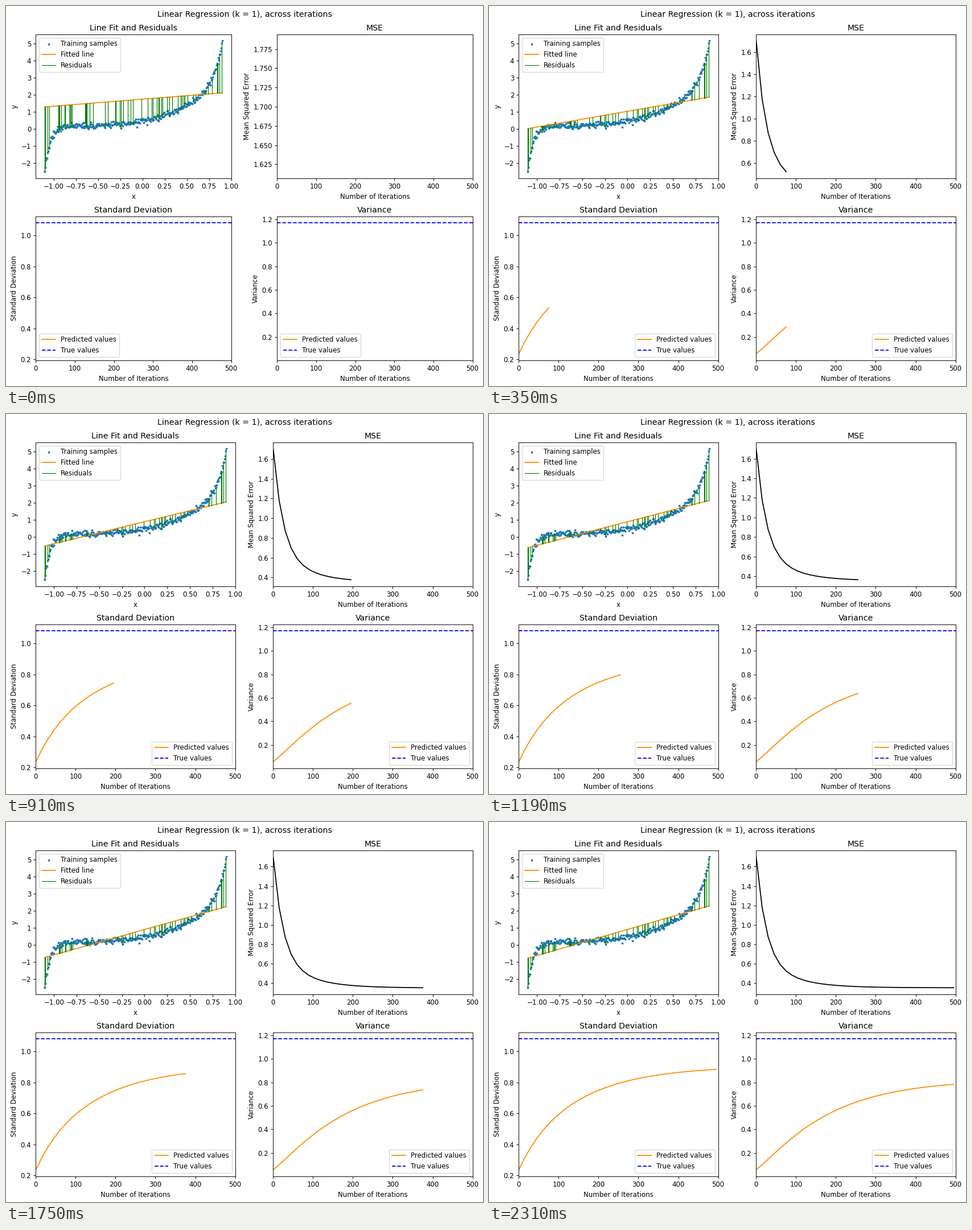
Animation of 838x668 px, one loop 2.38 s. Source, as a matplotlib script:

```python
import numpy as np
import matplotlib.pyplot as plt
from matplotlib.animation import FuncAnimation

WIDTH, HEIGHT, DPI = 838, 668, 85
FRAMES, INTERVAL, STEP = 34, 70, 15
RATE = 0.02
X_MIN, X_MAX = -1.1, 0.9

# Moments of the training set and the best achievable fit
MEAN_X, VAR_X = -0.105, 1 / 3
MEAN_Y, VAR_Y = 0.755, 1.1695
BEST_SLOPE, NOISE_FLOOR = 1.571, 0.351

plt.rcParams["font.family"] = "DejaVu Sans"


def curve(x):
    """Gentle cubic with a steep drop at the left end and a rise at the right."""
    cubic = 0.46 + 1.02 * x + 1.22 * x**2 + 0.45 * x**3
    drop = 2.72 * np.exp((X_MIN - x) / 0.06)
    rise = 2.47 * np.exp((x - X_MAX) / 0.095)
    return cubic - drop + rise


def make_samples(count=320, sampled=58):
    rng = np.random.default_rng(4)
    x = np.linspace(X_MIN, X_MAX, count)
    noise = rng.normal(0, 0.095, count)
    noise[[0, -1]] = 0
    picked = np.append(0, rng.choice(count, sampled, replace=False))
    return x, curve(x) + noise, picked


def descend():
    """Gradient descent on the squared error, keeping every STEP-th state."""
    slope, bias = 0.4103, 1.747
    states = []
    for i in range(FRAMES * STEP):
        offset = bias + slope * MEAN_X - MEAN_Y
        if i % STEP == 0:
            mse = NOISE_FLOOR + offset**2 + VAR_X * (slope - BEST_SLOPE) ** 2
            states.append((slope, bias, mse))
        slope -= RATE * (MEAN_X * offset + VAR_X * (slope - BEST_SLOPE))
        bias -= RATE * offset
    return np.array(states).T


def place(ax, left, right, top, bottom):
    ax.set_position([left / WIDTH, 1 - bottom / HEIGHT,
                     (right - left) / WIDTH, (bottom - top) / HEIGHT])


def label(ax, title, xlabel, ylabel):
    ax.set_title(title)
    ax.set_xlabel(xlabel)
    ax.set_ylabel(ylabel)


def padded_ylim(ax, low, high):
    margin = 0.05 * (high - low)
    ax.set_ylim(low - margin, high + margin)


xs, ys, picked = make_samples()
res_x, res_y = xs[picked], ys[picked]
gap = np.full(len(picked), np.nan)

slopes, biases, errors = descend()
iterations = np.arange(FRAMES) * STEP
variances = slopes**2 * VAR_X
deviations = np.sqrt(variances)

fig = plt.figure(figsize=(WIDTH / DPI + 1e-6, HEIGHT / DPI + 1e-6), dpi=DPI)
fig.suptitle("Linear Regression (k = 1), across iterations",
             y=1 - 19 / HEIGHT, va="baseline")
(fit_ax, mse_ax), (std_ax, var_ax) = fig.subplots(2, 2)

label(fit_ax, "Line Fit and Residuals", "x", "y")
fit_ax.scatter(xs, ys, s=5, label="Training samples")
fit_line, = fit_ax.plot([], [], color="darkorange", label="Fitted line")
residuals, = fit_ax.plot([], [], color="green", lw=1, label="Residuals")
fit_ax.set_xlim(-1.2, 1)
padded_ylim(fit_ax, ys.min(), ys.max())
fit_ax.legend(loc="upper left")

label(mse_ax, "MSE", "Number of Iterations", "Mean Squared Error")
mse_line, = mse_ax.plot([], [], color="black")
mse_ax.set_xlim(0, 500)


def spread_plot(ax, title, first, true_value):
    label(ax, title, "Number of Iterations", title)
    line, = ax.plot([], [], color="darkorange", label="Predicted values")
    ax.plot([0, 500], [true_value] * 2, color="blue", ls="--", label="True values")
    ax.set_xlim(0, 500)
    padded_ylim(ax, first, true_value)
    return line


std_line = spread_plot(std_ax, "Standard Deviation", deviations[0], VAR_Y**0.5)
var_line = spread_plot(var_ax, "Variance", variances[0], VAR_Y)


def update(frame):
    # The wider first error labels and the free corner only apply at the start
    inset, corner = (7, "lower left") if frame == 0 else (0, "lower right")
    for row, top in zip(((fit_ax, mse_ax), (std_ax, var_ax)), (49.8, 369.8)):
        place(row[0], 52.4, 402.55 - inset, top, top + 253)
        place(row[1], 469.4 + inset, 819.55, top, top + 253)
    for ax in (std_ax, var_ax):
        ax.legend(loc=corner)

    slope, bias = slopes[frame], biases[frame]
    ends = np.array([X_MIN, X_MAX])
    fit_line.set_data(ends, slope * ends + bias)
    residuals.set_data(
        np.column_stack([res_x, res_x, gap]).ravel(),
        np.column_stack([res_y, slope * res_x + bias, gap]).ravel())

    shown = slice(frame + 1)
    for line, values in ((mse_line, errors), (std_line, deviations),
                         (var_line, variances)):
        line.set_data(iterations[shown], values[shown])
    mse_ax.relim()
    mse_ax.autoscale_view(scalex=False)
    return []


anim = FuncAnimation(fig, update, frames=FRAMES, interval=INTERVAL,
                     init_func=lambda: update(0), repeat=True, repeat_delay=0)
plt.show()
```
